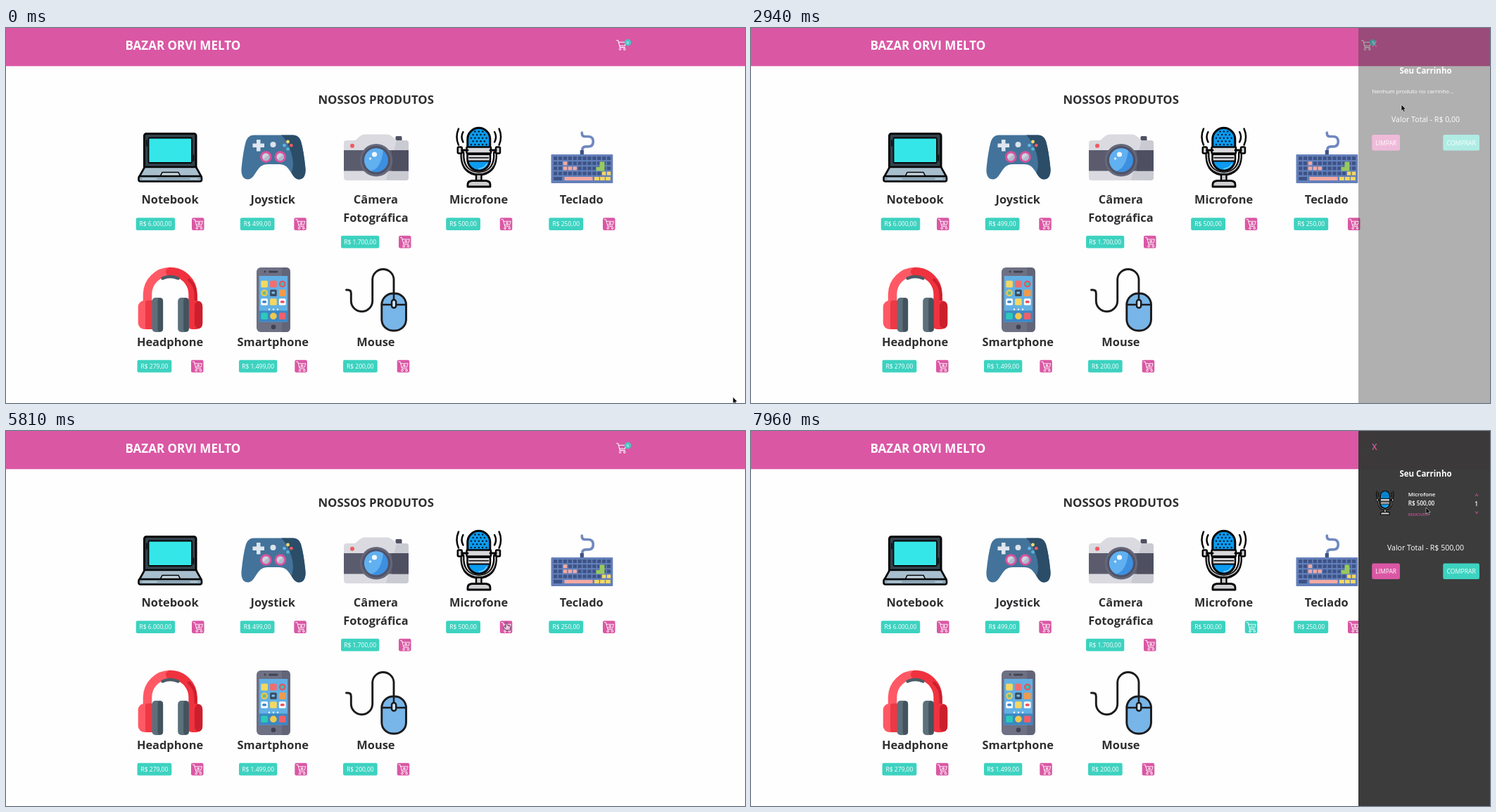
Recreate the animation shown at these times as an HTML page. Size 1050 by 534 pixels, loop 8000 ms.

```html
<!DOCTYPE html>
<html lang="pt">
<head>
<meta charset="utf-8">
<title>Loja</title>
<style>
html, body { margin: 0; width: 100%; height: 100%; overflow: hidden; background: #fefefe; }
svg { display: block; width: 100%; height: 100%; }
text { font-family: "Open Sans", "Noto Sans", sans-serif; }
</style>
</head>
<body>
<svg id="stage" viewBox="0 0 1050 534"></svg>
<script>
const PINK = '#da57a4', TEAL = '#3dd2c0', INK = '#2f2e30', BLACK = '#050505';

const rect = (x, y, w, h, fill, rx = 0, more = '') =>
  `<rect x="${x}" y="${y}" width="${w}" height="${h}" fill="${fill}" rx="${rx}" ${more}/>`;
const dot = (x, y, r, fill, more = '') => `<circle cx="${x}" cy="${y}" r="${r}" fill="${fill}" ${more}/>`;
const shape = (d, fill, more = '') => `<path d="${d}" fill="${fill}" ${more}/>`;
const line = (d, color, w) =>
  `<path d="${d}" fill="none" stroke="${color}" stroke-width="${w}" stroke-linecap="round" stroke-linejoin="round"/>`;
const text = (x, y, size, str, fill = '#fff', weight = 400, anchor = 'start', more = '') =>
  `<text x="${x}" y="${y}" font-size="${size}" fill="${fill}" font-weight="${weight}" text-anchor="${anchor}" ${more}>${str}</text>`;
const edge = (w, color = BLACK) => `stroke="${color}" stroke-width="${w}" stroke-linejoin="round"`;
const range = n => [...Array(n).keys()];

// Product pictures, drawn in stage coordinates
function notebook() {
  return rect(196.5, 150.5, 73.5, 55, '#33424c', 3, edge(3)) +
    rect(202.5, 156.5, 61.5, 35.5, '#35e6e8', 1.5, edge(1.8)) +
    line('M200 160v8M266.5 181v8', BLACK, 1.5) +
    shape('M197 198h73l7.5 13.5h-88z', '#a8bfce', edge(2.6)) +
    shape('M222 205.5h23l3 6h-29z', '#c5d5df', edge(1.6)) +
    rect(188.5, 211, 89.5, 7.5, '#8da6b7', 2.5, edge(2.6)) +
    line('M194 214.8h20M262 214.8h10', '#bfd1dc', 1.4);
}

function joystick() {
  const body = 'M352 152.5H408Q416 152.5 419 161Q423 175 425.3 198C427 212 421 216 415.5 215.5C408 215 405 203 398 197Q394 194 388 194H372Q366 194 362 197C355 203 352 215 344.5 215.5C339 216 333 212 334.7 198Q337 175 341 161Q344 152.5 352 152.5Z';
  return shape(body, '#43739a') +
    shape('M391 152.5H408Q416 152.5 419 161Q423 175 425.3 198C427 212 421 216 415.5 215.5C411 215 408 211 405.5 206C412 195 405 165 391 152.5Z', '#2b4d68') +
    shape('M356 159h5.5v5.5h5.5v5.5h-5.5v5.5h-5.5v-5.5h-5.5v-5.5h5.5z', '#dfe6ef') +
    dot(379.5, 166, 4, '#dce3ec') +
    [369.3, 389.7].map(x => dot(x, 183.5, 8.3, '#d9529d') + dot(x, 183.5, 5.2, '#ccd4e0') +
      shape(`M${x - 4} 187l8-7a5 5 0 0 1-8 7z`, '#aebbce')).join('') +
    dot(400.5, 162, 2.4, '#f7d968') + dot(395.5, 167.2, 2.4, '#62b3e8') +
    dot(405.3, 167.2, 2.4, '#ee5a68') + dot(400.5, 172.3, 2.4, '#55b7d4');
}

function camera() {
  return rect(553.5, 154, 9, 8, '#4f5163', 1.5) +
    shape('M484 160h12l7-6q3-2.5 6-2.5h33q3 0 6 2.5l7 6h13q4 0 4 4v49q0 4-4 4H484q-4 0-4-4v-49q0-4 4-4z', '#dadae0') +
    shape('M540 216.5L555 160h13q4 0 4 4v49q0 4-4 4z', '#cacad2') +
    rect(480, 174, 92, 29.5, '#5a5c6e') + rect(548, 174, 24, 29.5, '#4e5062') +
    dot(492, 167.7, 3, '#ef5b63') +
    dot(526, 188.3, 23.2, '#66687a') + dot(526, 188.3, 20.2, '#505265') +
    dot(526, 188.3, 17, '#3d8fe0') +
    shape('M526 171.3a17 17 0 0 0-7 32.5q14-4 17-29.5a17 17 0 0 0-10-3z', '#61b0f0') +
    dot(523.5, 180, 3.6, '#f2f8ff') + dot(517.5, 186, 1.8, '#d6ebfd');
}

function microphone() {
  const mesh = range(5).map(r => range(5 - r % 2).map(c =>
    dot(661 + c * 5.4 + r % 2 * 2.7, 147.5 + r * 4.6, 1.25, '#061b2b')).join('')).join('');
  const waves = 'M649.5 148q-4 7 0 14.5M643 143.5q-5 11.5 0 23';
  return line('M648.5 178V184Q650 206 671.8 208Q693.5 206 695 184V178', BLACK, 6) +
    line('M648.5 179V184Q650 205 671.8 207Q693.5 205 695 184V179', '#c9c9cc', 1.6) +
    rect(655.8, 142.3, 32, 61, '#0b9bf0', 16, edge(3)) + mesh +
    rect(655.8, 180, 32, 9.5, '#d3d3d6', 0, edge(2)) + line('M658 184.8h27.5', BLACK, 1.4) +
    line('M672 200.5q8-1 11-7', '#7ed0ff', 1.6) +
    rect(654.5, 169.5, 34.5, 9, '#d8d8db', 1, edge(2.5)) +
    [641.8, 696].map(x => rect(x, 169.5, 6, 9, '#d0d0d3', 1.5, edge(2.5))).join('') +
    line('M648 174h8M688 174h8', BLACK, 3) +
    rect(668, 208.5, 7.5, 9, '#c9c9cc', 0, edge(2.4)) +
    shape('M656 226v-3q0-5 6-5.5h20q6 .5 6 5.5v3z', '#d0d0d3', edge(2.8)) +
    line(waves, BLACK, 2.5) + `<g transform="matrix(-1 0 0 1 1343.6 0)">${line(waves, BLACK, 2.5)}</g>`;
}

function keyboard() {
  const keys = range(48).map(i => {
    const col = i % 12, row = i / 12 | 0;
    const pink = (row === 1 && col === 2) || (row === 2 && col > 1 && col < 5);
    const fill = pink ? '#f5a9a2' : row === 3 && col > 9 ? '#f6d75f' : '#3d5387';
    return rect(778 + col * 6.9, 183 + row * 7.2, 5.3, 5, fill);
  }).join('');
  return line('M818.3 149v1q0 4.500 4.500 4.500h4q7.500 0 7.500 7.200t-7.500 7.200h-3q-5 0-5 5v3'.replace(/00\b/g, ''), '#7088c0', 3.6) +
    rect(815.7, 174, 5.2, 7, '#3d5387') +
    rect(774.5, 180, 87.8, 41, '#6480ba', 1) + keys +
    shape('M843.500 190.500h7v13h-12v-5.500h5z', '#98c95f') +
    rect(778, 212, 12, 5, '#3d5387') + rect(793.5, 212, 40, 5, '#f5a9a2') +
    range(3).map(i => rect(836 + i * 8, 212, 6.8, 5, '#f6d75f')).join('');
}

function headphone() {
  const cushion = x => rect(x, 384, 15.6, 49, '#5c707b', 5) + rect(x + 8, 384.5, 7.6, 48, '#43535d', 4);
  return line('M201 394V379A32.3 32.3 0 0 1 233.3 347', '#ff5965', 12.5) +
    line('M233.3 347A32.3 32.3 0 0 1 265.6 379V394', '#f0323f', 12.5) +
    line('M260 358.5Q269.5 367 269.5 380V390', '#cc1f2d', 4) +
    line('M222.5 356.5Q233 351.5 244.5 356.5', '#4b5c66', 4.5) +
    rect(187.7, 388, 24, 41, '#ff5965', 9) + rect(198, 388, 12, 41, '#ee3845', 3) +
    rect(255.5, 388, 23.7, 41, '#f0323f', 9) + rect(268, 389, 11.2, 39, '#cc1f2d', 7) +
    cushion(207.5) + cushion(244.2);
}

function smartphone() {
  const fills = ['#f6d75f', '#f26d6d', '#ee4f5e', '#f0c94c', '#3d4c63', '#f39a4a', '#ffffff', '#f6d75f', '#ffffff', '#2cc9b9', '#f0c94c', '#f25f68'];
  const apps = fills.map((fill, i) => {
    const x = 362.3 + i % 3 * 12.8, y = [359.8, 372.5, 385.2, 405.5][i / 3 | 0];
    return rect(x, y, 9.6, 9.6, fill, [2, 3, 10].includes(i) ? 4.8 : 1.5);
  }).join('');
  return rect(356, 341, 47.8, 92, '#6e7083', 6) + shape('M392 341h6q5.8 0 5.8 6v80q0 6-5.8 6h-6z', '#626478') +
    rect(359.7, 353, 40.5, 65.5, '#62b0e4') + rect(359.7, 402.5, 40.5, 16, '#3c87c4') + apps +
    dot(392.7, 364.6, 2.6, '#2cc9b9') + dot(367.1, 377.3, 2.6, '#6cbf8b') +
    rect(364, 388.2, 6.2, 3.6, '#3c87c4', 1.8) + rect(389.6, 388.2, 6.2, 3.6, '#ee4f5e', 1.8) +
    rect(377.5, 375.5, 4.5, 3, '#7fc2ec', 1) +
    [374, 380, 386].map(x => dot(x, 400.8, 1.2, '#fff')).join('') +
    rect(373, 345.7, 13.5, 2.8, '#3f4152', 1.4) + dot(368, 347, 1.4, '#3f4152') + dot(380, 425.7, 3.3, '#3f4152');
}

function mouse() {
  const ink = '#1b1b1d';
  return line('M483.5 373H486Q490.3 373 490.3 378V388.5A15.2 15.2 0 0 0 520.7 388.5V357.5A15.2 15.2 0 0 1 551 357.5V378', ink, 2.9) +
    rect(533.8, 378, 34.7, 53, '#78b5e8', 16, edge(2.9, ink)) +
    line('M534 394h34M551 379v8', ink, 2.5) +
    rect(548, 387, 6.2, 11.5, '#cfe6f8', 3, edge(2.5, ink));
}

// Shopping cart glyph on a 14 x 15 box; sign is an extra path inside the basket
const cart = (x, y, sign = '', w = 1) => `<g transform="translate(${x} ${y})">` +
  line('M.5 .7H2.7L5.3 10.6H12.3M3.4 3.3H13.7L12.3 8.3H4.7' + sign, '#fff', w) +
  dot(5.5, 13.2, 1.3, 'none', 'stroke="#fff"') + dot(11.8, 13.2, 1.3, 'none', 'stroke="#fff"') + '</g>';

const cartButton = (x, y, id, fill, sign) => `<g id="${id}">` + rect(x, y, 17.5, 17.7, fill, 2.2) +
  cart(x + 1.7, y + 1.8, sign, .9) + '</g>';
const PLUS = 'M8.5 4.2v3.4M6.8 5.9h3.4', MINUS = 'M6.8 5.9h3.4';

// draw, name lines, price, price x, price width, button x
const products = [
  [notebook, ['Notebook'], '6.000,00', 184.7, 55.5, 264],
  [joystick, ['Joystick'], '499,00', 332.8, 48.7, 409.3],
  [camera, ['Câmera', 'Fotográfica'], '1.700,00', 476, 54.3, 558],
  [microphone, ['Microfone'], '500,00', 625.2, 48.8, 701.8],
  [keyboard, ['Teclado'], '250,00', 771.3, 48.9, 848],
  [headphone, ['Headphone'], '279,00', 186.5, 48.8, 263],
  [smartphone, ['Smartphone'], '1.499,00', 331, 54.3, 410.3],
  [mouse, ['Mouse'], '200,00', 479, 48.7, 555.7],
];

const productCard = ([draw, names, price, px, pw, bx], i) => {
  const cx = 233 + i % 5 * 146.2, base = i < 5 ? 250 : 452.5;
  const y = base + 20.2 + (names.length - 1) * 25.6;
  return draw() +
    names.map((name, n) => text(cx, base + n * 25.6, 16.4, name, INK, 700, 'middle')).join('') +
    rect(px, y, pw, 17.7, TEAL, 2.2) +
    text(px + pw / 2, y + 12, 8.5, 'R$ ' + price, '#fff', 400, 'middle') +
    cartButton(bx, y, 'add' + i, PINK, PLUS);
};

const totals = (y, value) =>
  text(958.5, y + 4, 10.6, 'Valor Total - R$ ' + value, '#fff', 400, 'middle') +
  rect(882.3, y + 22.5, 39.7, 22.5, PINK, 2.2) + text(902.2, y + 37, 8.5, 'LIMPAR', '#fff', 400, 'middle') +
  rect(983.3, y + 22.5, 51.7, 22.5, TEAL, 2.2) + text(1009.2, y + 37, 8.7, 'COMPRAR', '#fff', 400, 'middle');

const header = rect(0, 0, 1050, 54.3, PINK) +
  text(169.5, 31, 17, 'BAZAR ORVI MELTO', '#fff', 700) +
  cart(867, 17, '', 1.1) + dot(883.5, 20.7, 4.7, '#45c8c4') +
  text(883.5, 23, 6, '0', '#fff', 400, 'middle', 'id="count"');

const item = `<g transform="translate(632.1 28.6) scale(.4)">${microphone()}</g>` +
  text(933.7, 93.2, 7.9, 'Microfone', '#fff', 600) + text(933.7, 106.2, 8.2, 'R$ 500,00', '#fff', 600) +
  text(933.7, 121.3, 6.1, 'REMOVER', PINK) + text(1030.7, 106.7, 8.2, '1', '#fff', 600, 'middle') +
  line('M1029.3 92.7l1.7-3 1.7 3M1029.3 114.7l1.7 3 1.7-3', PINK, .9);

const panel = '<g id="panel">' + rect(863, 0, 187, 534, '#393939', 0, 'opacity=".98"') +
  text(886, 27.3, 11.7, 'X', PINK, 600, 'middle') +
  text(958.5, 65.2, 11.5, 'Seu Carrinho', '#fff', 700, 'middle') +
  `<g id="empty">${text(882.3, 93.3, 7.95, 'Nenhum produto no carrinho...')}${totals(129.5, '0,00')}</g>` +
  `<g id="filled">${item}${totals(166, '500,00')}</g></g>`;

const pointer = '<g id="pointer"><g id="arrow">' +
  shape('M0 0V9L2 7.2L3.5 10.3L5 9.6L3.6 6.5H6.3Z', '#000', 'stroke="#fff" stroke-width=".5"') + '</g><g id="hand">' +
  shape('M-1 1Q0-.5 1 1V4.5L5 5.5Q6 6 5.7 7.5L5 11.5H-1.5L-4 7.5Q-4 6-2.5 6.5L-1 8Z', '#fff', 'fill-opacity=".35" stroke="#1c3338" stroke-width=".7"') +
  '</g></g>';

document.getElementById('stage').innerHTML =
  rect(0, 0, 1050, 534, '#fefefe') + header +
  text(525.7, 108.3, 16.8, 'NOSSOS PRODUTOS', INK, 700, 'middle') +
  products.map(productCard).join('') +
  cartButton(701.8, 270.2, 'added', TEAL, MINUS) + panel + pointer;

// Pointer track: time, x, y
const track = [
  [0, 1033, 526], [70, 1024, 496], [150, 1008, 453], [460, 1003, 449], [610, 946, 422], [840, 962, 390], [990, 1002, 235],
  [1120, 962, 112], [1220, 922, 54], [1380, 897, 28], [1610, 884, 14], [1680, 880, 17], [1950, 870, 34], [2310, 874, 20],
  [2480, 876, 23], [2700, 890, 50], [2940, 924, 109], [3240, 955, 158], [3500, 1022, 187], [3780, 965, 115], [4100, 886, 24],
  [4340, 886, 23], [4570, 870, 30], [4740, 778, 83], [5020, 750, 170], [5350, 721, 276], [5500, 715, 279], [5580, 708, 278],
  [5810, 711, 272], [6230, 711, 272], [6430, 770, 332], [6650, 880, 190], [6800, 905, 80], [6970, 882.5, 14],
  [7130, 878, 20], [7510, 877, 22], [7700, 890, 32], [7880, 930, 75], [7960, 959, 109], [8000, 959, 109],
];
const handTimes = [[1550, 2740], [4080, 4340], [5790, 6280], [6930, 7265]];

const $ = id => document.getElementById(id);
const show = (id, on) => $(id).setAttribute('visibility', on ? 'inherit' : 'hidden');
const fade = (t, start) => Math.min(1, Math.max(0, (t - start) / 500));

function render(t) {
  const next = track.findIndex(k => k[0] > t);
  const [t0, x0, y0] = track[next - 1], [t1, x1, y1] = track[next];
  const p = (t - t0) / (t1 - t0);
  $('pointer').setAttribute('transform', `translate(${x0 + (x1 - x0) * p} ${y0 + (y1 - y0) * p})`);

  const hand = handTimes.some(([from, to]) => t >= from && t < to);
  show('hand', hand);
  show('arrow', !hand);

  const bought = t >= 5980;
  show('add3', !bought);
  show('added', bought);
  show('empty', !bought);
  show('filled', bought);
  $('count').textContent = bought ? '1' : '0';

  $('panel').setAttribute('opacity', t < 4340 ? fade(t, 2740) : fade(t, 7265));
}

function tick() {
  render(performance.now() % 8000);
  requestAnimationFrame(tick);
}
tick();
</script>
</body>
</html>
```
